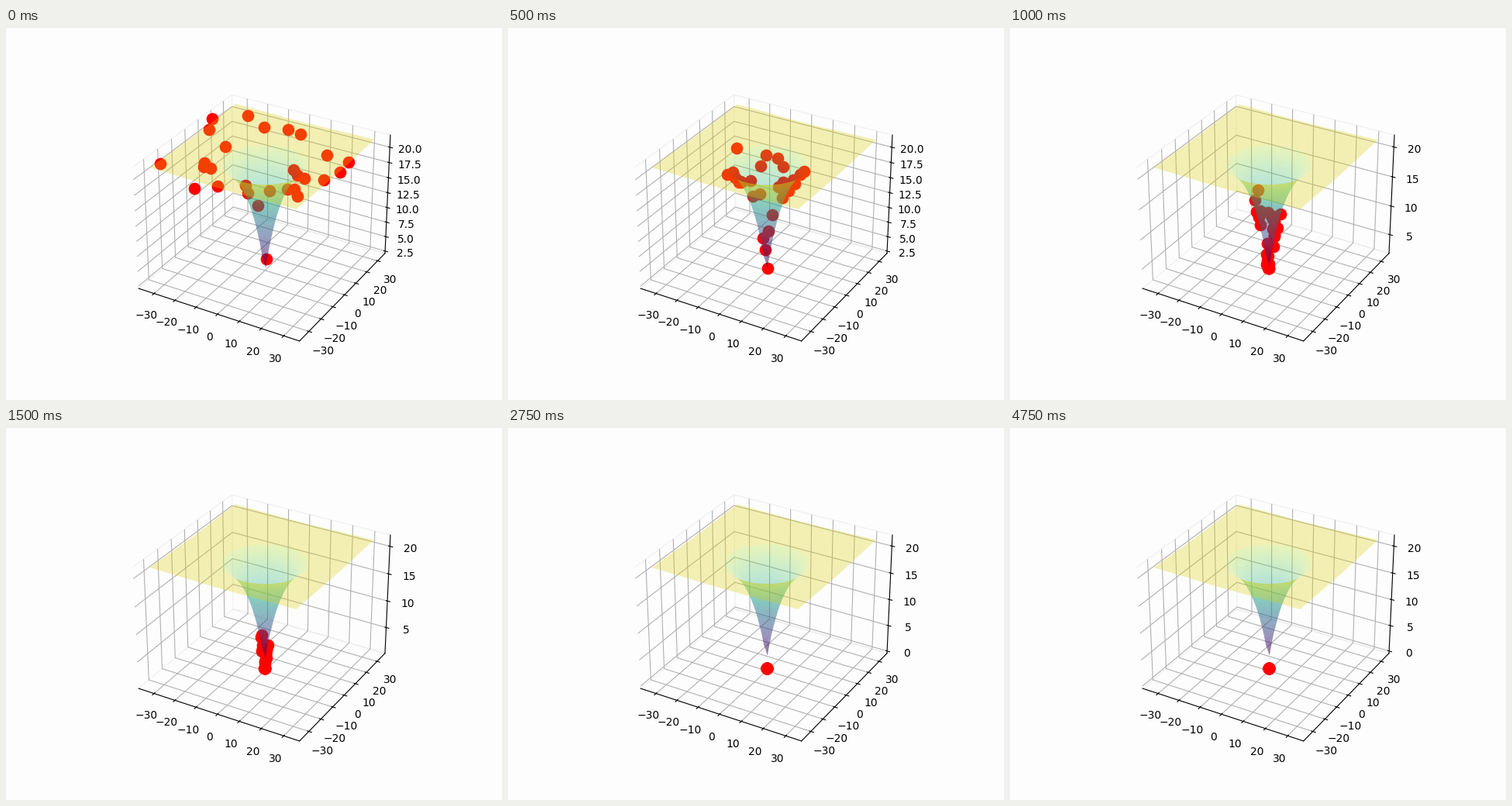
A matplotlib script that plays this animation: 640x480 px, repeating every 9.75 s.

```python
import numpy as np
import matplotlib.pyplot as plt
from matplotlib.animation import FuncAnimation
from matplotlib.colors import ListedColormap
from matplotlib.ticker import MultipleLocator

BOUND = 32.768
STEP_MS = 250
FRAMES = 39
COUNT = 28
LAST_MOVE = 11  # the swarm rests from this step on
PAPER = "#fdfdfd"


def ackley(x, y):
    bowl = -20 * np.exp(-0.2 * np.sqrt(0.5 * (x**2 + y**2)))
    waves = -np.exp(0.5 * (np.cos(2 * np.pi * x) + np.cos(2 * np.pi * y)))
    return bowl + waves + np.e + 20


def padded(lo, hi, margin=0.0):
    """Widen a range by a data margin, then by the usual 3D border of 1/48."""
    for m in (margin, 1 / 48):
        pad = m * (hi - lo)
        lo, hi = lo - pad, hi + pad
    return lo, hi


# The unit step keeps the cosine ripple constant, so the mesh is a smooth funnel.
grid = np.arange(-BOUND, BOUND, 1)
X, Y = np.meshgrid(grid, grid)
Z = ackley(X, Y)

rng = np.random.default_rng(7)
start = rng.uniform(-BOUND, BOUND, (2, COUNT))
pace = 1 + 2 * np.linspace(0, 1, COUNT) ** 3  # a few particles lead


def lowest(step):
    """Best value found so far; the swarm beats the mesh after step 3."""
    return Z.min() * np.exp(-0.18 * max(step - 3, 0) ** 2)


def swarm(step):
    """Every particle closes in on the optimum, faster with each step."""
    shrink = np.exp(-0.2 * step**1.5 * pace) if step < LAST_MOVE else 0
    x, y = start * shrink
    return x, y, np.maximum(ackley(x, y), lowest(step))


colors = plt.get_cmap("viridis")(np.linspace(0, 1, 256))
colors[230:, :3] = np.array([222, 210, 14]) / 255  # flat plateau

fig = plt.figure(figsize=(6.4, 4.8), dpi=100, facecolor=PAPER)
ax = fig.add_subplot(projection="3d", facecolor=PAPER)
ax.plot_surface(X, Y, Z, rstride=1, cstride=1, cmap=ListedColormap(colors),
                alpha=0.32, linewidth=0, antialiased=True)
dots, = ax.plot(*swarm(0), "o", color="red", ms=10.3)
for axis in (ax.xaxis, ax.yaxis, ax.zaxis):
    axis.pane.set_fill(False)
    axis.pane.set_edgecolor("#e6e6e6")
ax.set_xlim(*padded(grid[0], grid[-1], 0.05))


def update(step):
    y_top = BOUND if step else grid[-1]
    z_lim = padded(lowest(step), Z.max())
    ax.set_ylim(*padded(grid[0], y_top, 0.05))
    ax.set_zlim(*z_lim)
    ax.zaxis.set_major_locator(MultipleLocator(5 if np.ptp(z_lim) > 20 else 2.5))
    dots.set_data_3d(*swarm(step))
    return [dots]


anim = FuncAnimation(fig, update, frames=FRAMES, interval=STEP_MS,
                     repeat=True, repeat_delay=0, blit=False)
plt.show()
```
